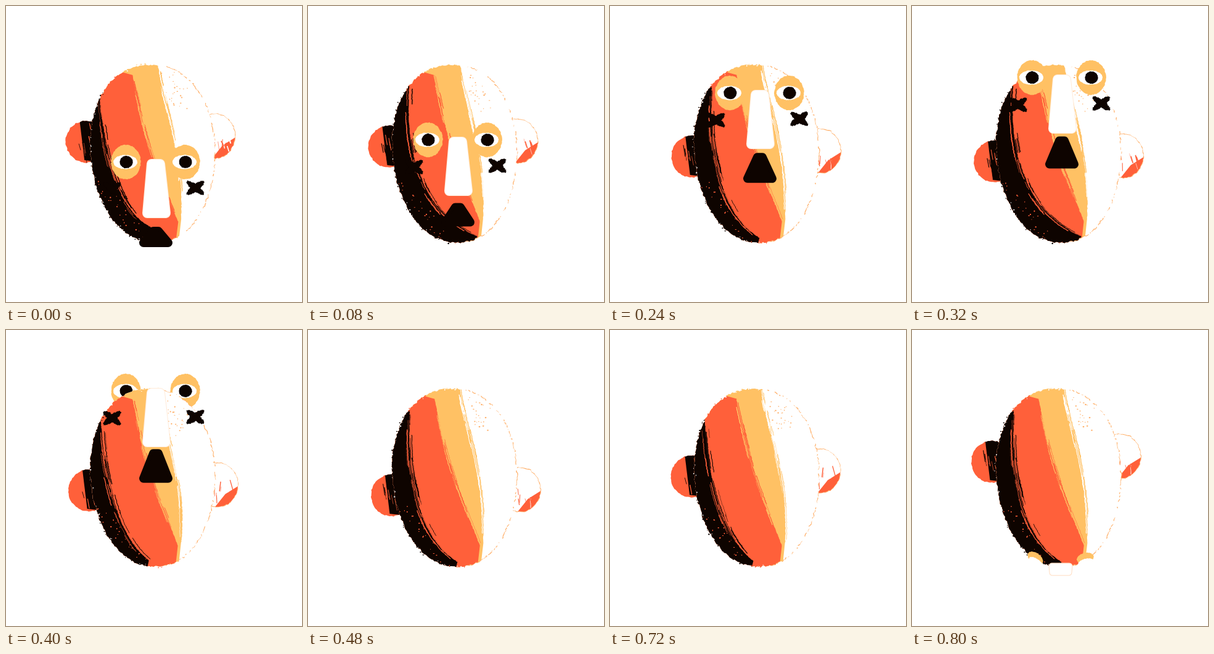
These frames come from a looping animation (480x480 px, 0.88 s). An HTML page with a canvas:

```html
<!DOCTYPE html>
<html lang="en">
<head>
<meta charset="utf-8">
<title>Painted head</title>
<style>
  html, body { margin: 0; width: 100%; height: 100%; overflow: hidden; background: #fff; }
  canvas { display: block; width: 480px; height: 480px; }
</style>
</head>
<body>
<canvas id="stage" width="480" height="480"></canvas>
<script>
const ctx = document.getElementById('stage').getContext('2d');
const ORANGE = '#ff603a', YELLOW = '#ffc164', BLACK = '#0e0400', WHITE = '#fff', PEACH = '#ffb06a';
const STEP = 80, STEPS = 11;

// Eye height while the face climbs; the other features hang below it.
const EYE_Y = [253, 217, 168, 141, 116, 99];

// The four painted heads differ in where the black stroke begins and ends.
const COATS = [
  { start: [152, 145], foot: [238, 360] },
  { start: [164, 130], foot: [275, 374] },
  { start: [154, 145], foot: [232, 374] },
  { start: [165, 130], foot: [242, 376] }
];

let seed = 1;
function rnd(a = 0, b = 1) {
  seed = (seed * 1664525 + 1013904223) % 4294967296;
  return a + (b - a) * seed / 4294967296;
}

function trace(pts, closed = true) {
  ctx.beginPath();
  pts.forEach(p => ctx.lineTo(p[0], p[1]));
  if (closed) ctx.closePath();
}

function fill(pts, color) {
  trace(pts);
  ctx.fillStyle = color;
  ctx.fill();
}

function stroke(pts, color, width) {
  trace(pts, false);
  ctx.strokeStyle = color;
  ctx.lineWidth = width;
  ctx.stroke();
}

// Polygon with rounded corners.
function blob(pts, color, width) {
  trace(pts);
  ctx.lineJoin = 'round';
  ctx.lineWidth = width;
  ctx.strokeStyle = ctx.fillStyle = color;
  ctx.stroke();
  ctx.fill();
}

function oval(x, y, rx, ry, color, jitter = 0.4, turn = 0) {
  const c = Math.cos(turn), s = Math.sin(turn);
  const pts = Array.from({ length: 72 }, (_, i) => {
    const a = i * Math.PI / 36, u = rx * Math.cos(a), v = ry * Math.sin(a);
    return [x + u * c - v * s + rnd(-jitter, jitter), y + u * s + v * c + rnd(-jitter, jitter)];
  });
  fill(pts, color);
  return pts;
}

function speck(x, y, color) {
  oval(x, y, rnd(0.4, 1.4), rnd(0.4, 1.2), color, 0.1);
}

function clipped(pts, paint) {
  ctx.save();
  trace(pts);
  ctx.clip();
  paint();
  ctx.restore();
}

function headRim() {
  return Array.from({ length: 300 }, (_, i) => {
    const a = i * Math.PI / 150, c = Math.cos(a), s = Math.sin(a);
    const half = 101 * Math.sign(c) * Math.abs(c) ** 0.9 * (1 - 0.05 * s);
    return [238 + half + 4 * s + rnd(-1.2, 1.2), 239.5 + 144 * s + rnd(-1.2, 1.2)];
  });
}

// Fill everything left of a Bezier edge, then drag dry bristles along it.
function coat([a, b, c, d], color, under, spread) {
  const edge = Array.from({ length: 140 }, (_, i) => {
    const t = i / 139, u = 1 - t;
    return [0, 1].map(k => u * u * u * a[k] + 3 * u * u * t * b[k] + 3 * u * t * t * c[k]
      + t * t * t * d[k] + rnd(-0.5, 0.5));
  });
  fill([[90, 80], ...edge, [d[0] - 6, 400], [90, 400]], color);
  for (let i = 0; i < 24; i++) {
    const from = Math.floor(rnd(0, 110)), part = edge.slice(from, from + rnd(8, 35));
    const over = i % 2, shift = over ? rnd(0, spread) : rnd(-spread, 0);
    stroke(part.map(p => [p[0] + shift, p[1]]), over ? color : under, rnd(0.4, 1.4));
  }
}

function paintHead({ start, foot }) {
  const rim = headRim();
  fill(rim, WHITE);
  clipped(rim, () => {
    coat([[246, 92], [255, 165], [289, 230], [284, 345]], YELLOW, WHITE, 3);
    coat([[205, 112], [230, 230], [235, 240], [279, 350]], ORANGE, YELLOW, 3);
    coat([start, [158, 235], [180, 335], foot], BLACK, ORANGE, 6);
    for (let i = 0; i < 25; i++) speck(rnd(252, 275) + i, rnd(105, 150) + i, PEACH);
    for (let i = 0; i < 25; i++) speck(150 + i * 3 + rnd(-10, 10), 290 + i * 3.4 + rnd(-10, 10), ORANGE);
  });
  rim.forEach(([x, y], i) => {
    if (x > 255) {
      if (rnd() < 0.6) stroke([[x, y], rim[(i + 1) % rim.length]], PEACH, rnd(0.5, 1.4));
    } else if (rnd() < 0.5) {
      const paint = x < 160 || (y > 240 && x < 230) ? BLACK : x < 190 || y > 240 ? ORANGE : YELLOW;
      speck(x + rnd(-2, 2), y + rnd(-2, 2), rnd() < 0.65 ? paint : WHITE);
    }
  });
}

function paintEars(y) {
  const sway = (y - 268) / 9, lx = 135.5 + sway, rx = 344.5 + sway, ry = y - 9;
  clipped(oval(lx, y, 33.5, 34, ORANGE, 0.8), () => {
    fill([[lx - 11, y - 36], [lx + 50, y - 36], [lx + 50, y + 36], [lx - 3, y + 30]], BLACK);
    for (let i = 0; i < 18; i++) {
      const x = lx + rnd(-14, 14), top = y + rnd(-32, 18);
      stroke([[x, top], [x + 3, top + rnd(8, 20)]], i % 2 ? BLACK : ORANGE, rnd(0.5, 1.4));
    }
  });
  const right = oval(rx, ry, 32.5, 36, WHITE, 0.8);
  clipped(right, () => {
    fill([[rx + 36, ry], [rx + 12, ry + 15], [rx - 8, ry + 40], [rx + 36, ry + 40]], ORANGE);
    for (let i = 0; i < 12; i++) {
      const x = rx + rnd(-6, 22), top = ry + rnd(-8, 16);
      stroke([[x, top], [x + rnd(-2, 5), top + rnd(8, 18)]], i % 2 ? ORANGE : WHITE, rnd(0.5, 1.8));
    }
  });
  right.forEach((p, i) => stroke([p, right[(i + 1) % right.length]], PEACH, rnd(0.3, 1.3)));
}

function paintEyes(y) {
  for (const x of [195, 291]) {
    oval(x - 0.5, y, 24, 28, YELLOW, 0.6);
    oval(x - 1.5, y, 19.5, 11.5, WHITE);
    oval(x, y, 10.5, 10, BLACK);
  }
}

function paintNose(top, base) {
  const shape = [[236, top + 7], [250, top + 7], [259, base - 8], [229, base - 8]];
  blob(shape, '#ffead8', 16);
  blob(shape, WHITE, 14);
}

function paintCross(x, y) {
  for (const turn of [-0.65, 0.65]) oval(x, y, 17.5, 5.5, BLACK, 0.8, turn);
}

function paintMouth(y, h) {
  blob([[239, y - h + 7], [247, y - h + 7], [263, y + h - 8], [223, y + h - 8]], BLACK, 14);
}

function paintFace(eye) {
  paintNose(eye - 4, eye + 91);
  paintCross(172, eye + 44);
  paintCross(307, eye + 42);
  paintMouth(eye + 122, 17 + (253 - eye) * 0.07);
}

// The next face rolling up from under the chin.
function paintChin() {
  for (const [x, turn] of [[200, 0.62], [281, -0.25]]) {
    oval(x, 370, 14, 8.5, YELLOW, 0.4, turn);
    oval(x + 1, 377, 13, 6, WHITE, 0.3, turn);
  }
  const tip = [[227, 383], [255, 383], [254, 393], [228, 393]];
  blob(tip, '#ffdcc0', 11);
  blob(tip, WHITE, 9);
}

// Ears sink steadily, then spring back up faster and faster.
function earY(step) {
  const d = step - 6;
  return 268 + (d < 0 ? 8 * d : -3.4 * d * d);
}

function draw(step) {
  const kind = (step < 4 ? step : step + 1) % 4;
  const eye = EYE_Y[step], behind = step === EYE_Y.length - 1;
  seed = 97 + kind * 7919;
  ctx.fillStyle = WHITE;
  ctx.fillRect(0, 0, 480, 480);
  paintEars(earY(step));
  if (behind) paintEyes(eye);
  paintHead(COATS[kind]);
  if (eye) {
    if (!behind) paintEyes(eye);
    paintFace(eye);
  }
  if (step === STEPS - 1) paintChin();
}

let shown = -1;
function tick() {
  const step = Math.floor(performance.now() / STEP) % STEPS;
  if (step !== shown) draw(shown = step);
  requestAnimationFrame(tick);
}
tick();
</script>
</body>
</html>
```
